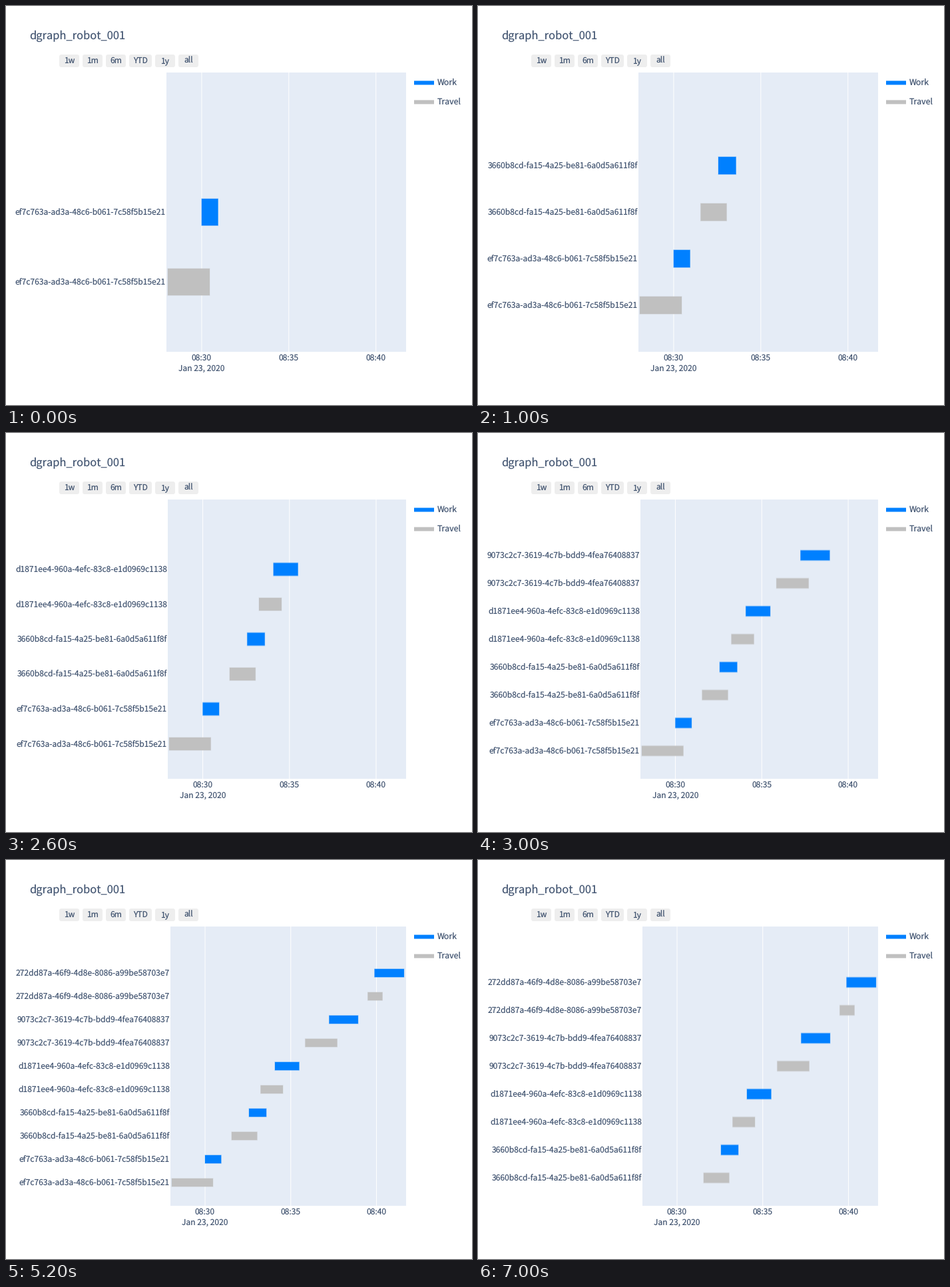
Write a matplotlib script that moves like this. It is 700x600 px and loops after 8 s.

```python
import matplotlib.pyplot as plt
from matplotlib.animation import FuncAnimation
from matplotlib.patches import FancyBboxPatch, Rectangle

plt.rcParams.update({
    "font.family": "Noto Sans CJK JP",
    "text.hinting": "none",
    "toolbar": "None",
})

W, H, DPI = 700, 600, 100
PX = 72 / DPI
INK, PLOT_BG, BUTTON = "#2a3f5f", "#e5ecf6", "#eeeeee"
WORK, TRAVEL = "#0080ff", "#c0c0c0"
RIGHT, TOP, BOTTOM = 601, 100, 520
T_MIN, T_SPAN = -2.02, 13.75  # minutes relative to 08:30
BAR_HALF = 0.2                # share of a row
RIM = 1                       # pale border inside each bar, in pixels

# task id, travel (start, end), work (start, end)
TASKS = [
    ("ef7c763a-ad3a-48c6-b061-7c58f5b15e21", (-1.944, 0.462), (0.0, 0.94)),
    ("3660b8cd-fa15-4a25-be81-6a0d5a611f8f", (1.55, 3.04), (2.565, 3.575)),
    ("d1871ee4-960a-4efc-83c8-e1d0969c1138", (3.243, 4.544), (4.078, 5.49)),
    ("9073c2c7-3619-4c7b-bdd9-4fea76408837", (5.845, 7.71), (7.243, 8.93)),
    ("272dd87a-46f9-4d8e-8086-a99be58703e7", (9.495, 10.35), (9.89, 11.61)),
]
BARS = [(name, span, color)
        for name, travel, work in TASKS
        for span, color in ((travel, TRAVEL), (work, WORK))]

# per second: left edge of the plot, first and last bar shown, current time
STATES = [
    (241, 0, 2, -2), (241, 0, 4, -2), (243, 0, 6, -2), (244, 0, 8, -2),
    (247, 0, 10, -2), (247, 0, 10, -2), (247, 1, 10, 0.175), (247, 2, 10, 1.2),
]

fig = plt.figure(figsize=(W / DPI, H / DPI), dpi=DPI, facecolor="white")
ax = fig.add_axes([0, 0, 1, 1])
ax.set(xlim=(0, W), ylim=(H, 0))
ax.axis("off")


def label(x, baseline, text, ha="left", size=12.05):
    return ax.text(x, baseline, text, ha=ha, va="baseline", alpha=0.87,
                   fontsize=size * PX, color=INK, zorder=4)


def box(x0, y0, x1, y1, color, z=3, alpha=1):
    return ax.add_patch(Rectangle((x0, y0), x1 - x0, y1 - y0, facecolor=color,
                                  linewidth=0, snap=False, zorder=z, alpha=alpha))


def draw_static():
    label(35, 50, "dgraph_robot_001", size=16.5)
    x = 80
    for text in ("1w", "1m", "6m", "YTD", "1y", "all"):
        width = 34 if text == "YTD" else 30
        ax.add_patch(FancyBboxPatch(
            (x, 73), width, 19, facecolor=BUTTON, linewidth=0,
            boxstyle="round,pad=0,rounding_size=3"))
        label(x + width / 2, 86, text, "center")
        x += width + 5
    for y, text, color in ((115.5, "Work", WORK), (144.5, "Travel", TRAVEL)):
        box(613, y - 3, 643, y + 3, color)
        label(648, y + 3.5, text, size=12.35)


dynamic = []


def draw(second):
    while dynamic:
        dynamic.pop().remove()
    left, first, last, now = STATES[second]

    def to_x(minute):
        return left + (minute - T_MIN) * (RIGHT - left) / T_SPAN

    dynamic.append(box(left, TOP, RIGHT, BOTTOM, PLOT_BG, z=1))
    for minute in (0, 5, 10):
        x = to_x(minute)
        dynamic.append(box(x - 0.5, TOP, x + 0.5, BOTTOM, "white", z=2))
        dynamic.append(label(x, 533, f"08:{30 + minute}", "center"))
    dynamic.append(label(to_x(0), 549, "Jan 23, 2020", "center"))

    shown = BARS[first:last]
    row = (BOTTOM - TOP) / (len(shown) + 2)
    for i, (name, (start, end), color) in enumerate(shown, 1):
        y = BOTTOM - i * row
        half = BAR_HALF * row
        x0, x1 = to_x(max(start, now)), to_x(end)
        dynamic.append(box(x0 - RIM / 2, y - half, x1 + RIM / 2, y + half,
                           color, alpha=0.3))
        dynamic.append(box(x0, y - half + RIM, x1, y + half - RIM, color))
        dynamic.append(label(left - 1, round(y) + 4, name, "right"))
    return dynamic


draw_static()
anim = FuncAnimation(fig, draw, frames=len(STATES), interval=1000,
                     repeat=True, repeat_delay=0, blit=False)
plt.show()
```
